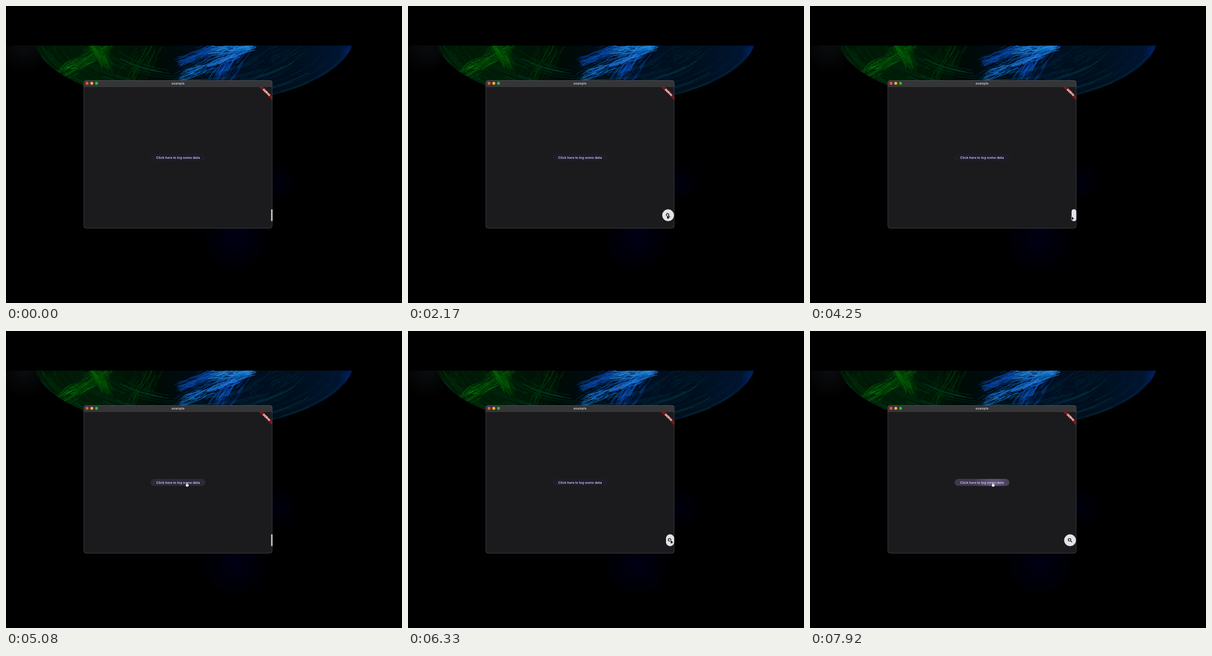
Write an HTML page with a canvas that moves like this. It is 640x480 px and loops after 8000 ms.

```html
<!DOCTYPE html>
<html lang="en">
<head>
<meta charset="utf-8">
<title>Dockable log button</title>
<style>
  html, body { margin: 0; width: 100%; height: 100%; overflow: hidden; background: #000; }
  canvas { display: block; width: 640px; height: 480px; }
</style>
</head>
<body>
<canvas id="stage" width="640" height="480"></canvas>
<script>
const LOOP = 8000;
const W = 640, H = 480, TOP = 64;
const ctx = document.getElementById('stage').getContext('2d');
const win = { x: 125.5, y: 120, w: 305, h: 239.5, r: 4, bar: 11 };
const right = win.x + win.w;
const midX = win.x + win.w / 2;
const action = { w: 89, h: 11.5, y: 244.8 };
const tab = { y: 338.2, size: 19.2, thin: 2 };

const mix = (a, b, k) => a + (b - a) * k;
const clamp = v => Math.max(0, Math.min(1, v));
const ramp = (t, from, to) => {
  const k = clamp((t - from) / (to - from));
  return k * k * (3 - 2 * k);
};

function rng(seed) {
  return () => (seed = (seed * 16807) % 2147483647) / 2147483647;
}

function roundBox(c, x, y, w, h, r) {
  c.beginPath();
  c.roundRect(x, y, w, h, r);
}

function disc(c, x, y, r, fill) {
  c.beginPath();
  c.arc(x, y, r, 0, Math.PI * 2);
  c.fillStyle = fill;
  c.fill();
}

function label(text, x, y, size, color, weight = 600) {
  ctx.font = `${weight} ${size}px Inter, Roboto, sans-serif`;
  ctx.fillStyle = color;
  ctx.textAlign = 'center';
  ctx.textBaseline = 'middle';
  ctx.fillText(text, x, y);
}

function glow(c, x, y, r, color, alpha) {
  const g = c.createRadialGradient(x, y, 0, x, y, r);
  g.addColorStop(0, `rgba(${color},${alpha})`);
  g.addColorStop(1, `rgba(${color},0)`);
  disc(c, x, y, r, g);
}

// Short random bristle marks that follow a line.
function brush(c, seed, [x0, y0], [x1, y1], spread, hue, light, alpha) {
  const rand = rng(seed * 7919);
  const angle = Math.atan2(y1 - y0, x1 - x0);
  const length = Math.hypot(x1 - x0, y1 - y0);
  c.save();
  c.translate(x0, y0);
  c.rotate(angle);
  for (let i = 0; i < 130; i++) {
    const u = rand() * length;
    const v = (rand() + rand() - 1) * spread;
    const run = 8 + rand() * 24;
    c.beginPath();
    c.moveTo(u - run / 2, v);
    c.quadraticCurveTo(u, v + (rand() - 0.5) * 10, u + run / 2, v + (rand() - 0.5) * 6);
    c.strokeStyle = `hsla(${hue},90%,${light * (0.4 + rand())}%,${alpha})`;
    c.lineWidth = 0.4 + rand() * 1.4;
    c.stroke();
  }
  c.restore();
}

// Thin nested arcs along the rim of the dark disc.
function rimArcs(c, x, y, rx, ry) {
  const rand = rng(4211);
  for (let i = 0; i < 80; i++) {
    const k = 1 - rand() * 0.5;
    const from = rand() * Math.PI;
    c.beginPath();
    c.ellipse(x, y, rx * k, ry * k, 0, from, from + 0.3 + rand() * 0.5);
    c.strokeStyle = `hsla(${mix(205, 130, from / Math.PI)},90%,16%,${0.2 + rand() * 0.35})`;
    c.lineWidth = 0.5 + rand();
    c.stroke();
  }
}

function makeWallpaper() {
  const layer = document.createElement('canvas');
  layer.width = W;
  layer.height = H;
  const c = layer.getContext('2d');
  c.beginPath();
  c.rect(0, TOP, W, H);
  c.clip();
  glow(c, 30, TOP, 45, '18,20,24', 0.6);
  glow(c, 370, 375, 60, '0,0,60', 0.35);
  glow(c, 440, 285, 35, '0,0,60', 0.25);

  const rim = [303, 48, 259, 110];
  c.beginPath();
  c.ellipse(...rim, 0, 0, Math.PI * 2);
  c.clip();
  const base = c.createLinearGradient(44, 0, 562, 0);
  ['#001506', '#001d06', '#000a06', '#000e24', '#000f1c', '#001636']
    .forEach((color, i, all) => base.addColorStop(i / (all.length - 1), color));
  c.fillStyle = base;
  c.fillRect(0, TOP, W, H);
  rimArcs(c, ...rim);

  brush(c, 2, [235, 60], [198, 122], 24, 130, 10, 0.4);
  brush(c, 3, [60, 66], [125, 140], 15, 132, 9, 0.4);
  brush(c, 5, [166, 64], [90, 110], 14, 122, 20, 0.5);
  brush(c, 7, [142, 62], [164, 94], 12, 122, 18, 0.4);
  brush(c, 11, [470, 62], [385, 118], 30, 205, 12, 0.4);
  brush(c, 13, [378, 66], [340, 118], 26, 216, 36, 0.5);
  brush(c, 17, [340, 68], [285, 90], 12, 216, 34, 0.5);
  brush(c, 19, [395, 66], [280, 116], 10, 211, 46, 0.55);
  brush(c, 23, [395, 66], [335, 72], 8, 208, 52, 0.5);
  glow(c, 560, 76, 22, '0,50,170', 0.5);
  return layer;
}

function drawBanner() {
  const inset = 9.4;
  ctx.save();
  ctx.beginPath();
  ctx.rect(win.x, win.y + win.bar, win.w, win.h);
  ctx.clip();
  ctx.translate(right - inset, win.y + win.bar + inset - 0.6);
  ctx.rotate(Math.PI / 4);
  ctx.fillStyle = '#7d1719';
  ctx.fillRect(-20, -2.4, 40, 4.8);
  label('DEBUG', 0, 0.1, 4.3, '#fff', 900);
  ctx.restore();
}

function drawWindow() {
  ctx.save();
  roundBox(ctx, win.x, win.y, win.w, win.h, win.r);
  ctx.fillStyle = '#1b1b1e';
  ctx.fill();
  ctx.clip();
  ctx.fillStyle = '#353537';
  ctx.fillRect(win.x, win.y, win.w, win.bar);
  drawBanner();
  ctx.restore();
  roundBox(ctx, win.x + 0.4, win.y + 0.4, win.w - 0.8, win.h - 0.8, win.r);
  ctx.strokeStyle = 'rgba(120,120,120,.4)';
  ctx.lineWidth = 0.8;
  ctx.stroke();
  ['#ff5148', '#f6b52c', '#24bd36'].forEach((color, i) => disc(ctx, 131 + i * 7.65, 125, 2.4, color));
  label('example', midX, 125.2, 5.2, '#c9c9cb');
}

function drawAction(t) {
  const hover = ramp(t, 4900, 5050) - ramp(t, 5400, 5550) + ramp(t, 7150, 7300);
  const press = ramp(t, 7650, 7850);
  ctx.save();
  roundBox(ctx, midX - action.w / 2, action.y - action.h / 2, action.w, action.h, action.h / 2);
  ctx.fillStyle = '#1e1c26';
  ctx.fill();
  ctx.clip();
  ctx.fillStyle = `rgba(208,188,255,${0.08 * hover + 0.1 * press})`;
  ctx.fill();
  if (press > 0) glow(ctx, 296, 248, mix(6, 32, press), '208,188,255', 0.25 * press);
  ctx.restore();
  label('Click here to log some data', midX, 244.9, 5.4, '#d0bfff');
}

function tabWidth(t) {
  const open = ramp(t, 1650, 2200) - ramp(t, 3720, 4580) + ramp(t, 6030, 6530);
  return mix(tab.thin, tab.size, open);
}

function drawTab(width) {
  // The open tab floats just clear of the window edge.
  const end = right + 0.2 - 0.8 * width / tab.size;
  ctx.save();
  roundBox(ctx, end - width, tab.y - tab.size / 2, width, tab.size, width / 2);
  ctx.fillStyle = '#e6e3e8';
  ctx.fill();
  ctx.clip();
  ctx.globalAlpha = clamp((width - 8) / 4);
  ctx.translate(end - width / 2, tab.y);
  ctx.strokeStyle = '#1d1b22';
  ctx.lineWidth = 1.2;
  ctx.beginPath();
  ctx.arc(-0.8, -0.8, 2.1, 0, Math.PI * 2);
  ctx.moveTo(0.8, 0.8);
  ctx.lineTo(3.2, 3.2);
  ctx.stroke();
  ctx.restore();
}

function drawArrow() {
  ctx.beginPath();
  ctx.moveTo(0, 0);
  ctx.lineTo(0, 5.6);
  ctx.lineTo(1.5, 4.4);
  ctx.lineTo(2.6, 6.3);
  ctx.lineTo(2.4, 4.1);
  ctx.lineTo(4, 4);
  ctx.closePath();
  outline('#eee', '#080808');
}

function drawHand() {
  ctx.beginPath();
  ctx.roundRect(-0.6, 0, 1.3, 4, 0.6);
  ctx.roundRect(-1.8, 2.4, 4.6, 4, 1.4);
  outline('#151515', '#fff');
}

function outline(stroke, fill) {
  ctx.strokeStyle = stroke;
  ctx.lineWidth = 0.9;
  ctx.stroke();
  ctx.fillStyle = fill;
  ctx.fill();
}

const ENTER = 900, TRAVEL = 650;
const moves = [
  { at: ENTER, x: 425.8, y: 340 },
  { at: 1600, x: 418.5, y: 338.5 },
  { at: 3600, x: 422.8, y: 340 },
  { at: 4400, x: 292.4, y: 245 },
  { at: 5350, x: 424.6, y: 338 },
  { at: 6600, x: 295.6, y: 245 }
];

function drawPointer(t) {
  if (t < ENTER) return;
  let x = 452, y = 352;
  for (const m of moves) {
    const k = ramp(t, m.at, m.at + TRAVEL);
    x = mix(x, m.x, k);
    y = mix(y, m.y, k);
  }
  const over = Math.abs(x - midX) < action.w / 2 && Math.abs(y - action.y) < action.h / 2;
  ctx.save();
  ctx.translate(x, y);
  over ? drawHand() : drawArrow();
  ctx.restore();
}

const wallpaper = makeWallpaper();

function draw(t) {
  ctx.fillStyle = '#000';
  ctx.fillRect(0, 0, W, H);
  ctx.drawImage(wallpaper, 0, 0);
  drawWindow();
  drawAction(t);
  drawTab(tabWidth(t));
  drawPointer(t);
}

const start = performance.now();
function tick() {
  draw((performance.now() - start) % LOOP);
  requestAnimationFrame(tick);
}
tick();
</script>
</body>
</html>
```
